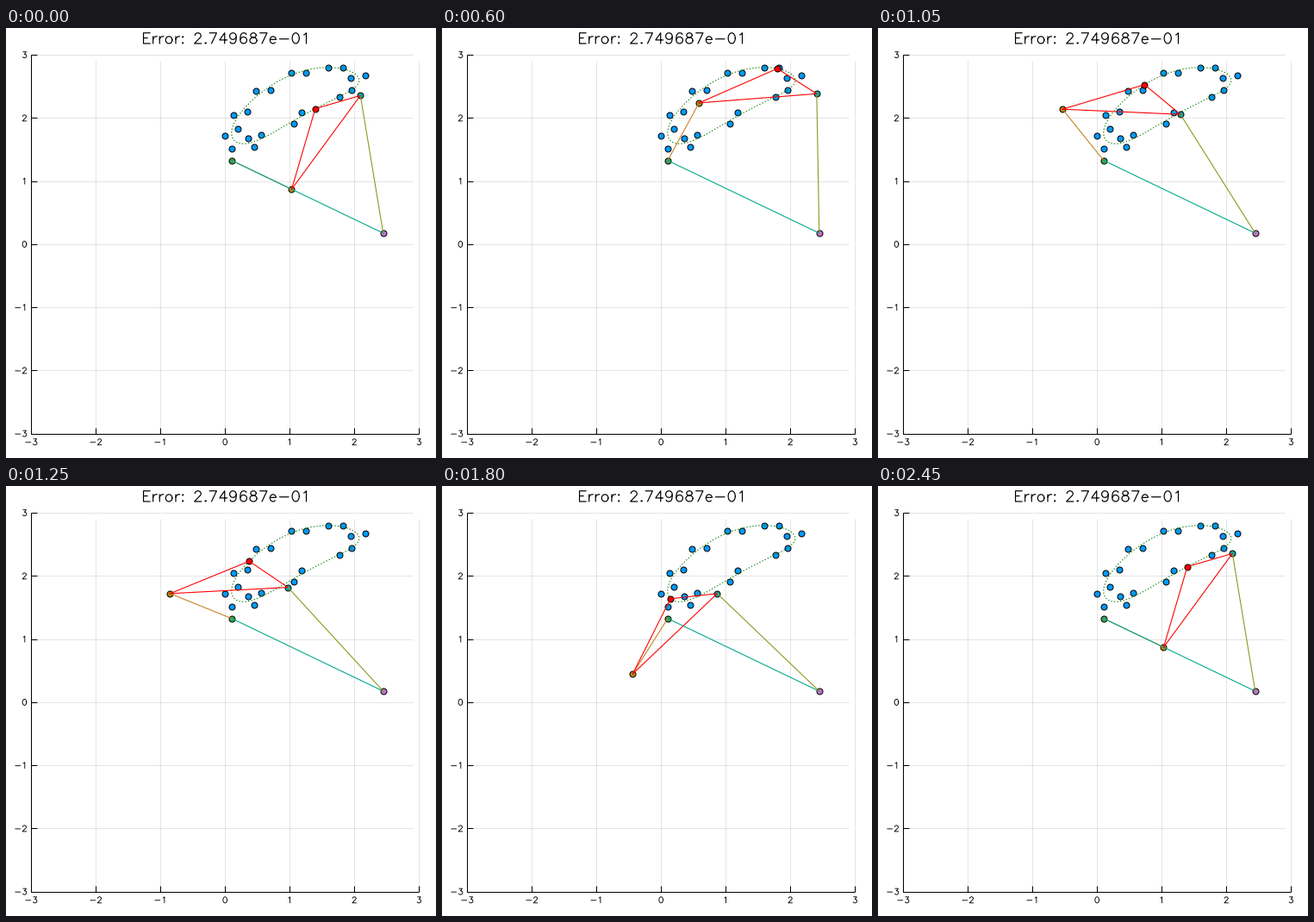
A matplotlib script for the animation above (2.5 s loop, 499 by 499 pixels).

```python
import numpy as np
import matplotlib.pyplot as plt
from matplotlib.animation import FuncAnimation
from matplotlib.collections import LineCollection

SIZE = 499
FRAMES = 50
PX = 0.72                       # points per pixel at 100 dpi
CENTER = np.array([254.2, 250.8])
SCALE = np.array([75.0, -73.25])

# Four-bar linkage, in data units
PIVOT_A = np.array([0.103, 1.325])
PIVOT_D = np.array([2.447, 0.174])
CRANK, COUPLER, ROCKER = 1.033, 1.8265, 2.2085
TRACER = (1.251, 0.446)         # along and across the coupler

SAMPLES = [
    (0.0, 1.715), (0.105, 1.51), (0.13, 2.05), (0.195, 1.827),
    (0.348, 2.10), (0.357, 1.677), (0.445, 1.545), (0.48, 2.425),
    (0.557, 1.737), (0.705, 2.435), (1.02, 2.72), (1.058, 1.902),
    (1.188, 2.082), (1.245, 2.717), (1.597, 2.792), (1.77, 2.328),
    (1.823, 2.80), (1.95, 2.626), (1.96, 2.446), (2.17, 2.67),
]


def to_px(points):
    return CENTER + np.asarray(points, float) * SCALE


def pose(turn):
    """Crank end, rocker end and traced point after a fraction of a turn."""
    base = PIVOT_D - PIVOT_A
    angle = np.arctan2(base[1], base[0]) + 2 * np.pi * turn
    b = PIVOT_A + CRANK * np.array([np.cos(angle), np.sin(angle)])
    gap = PIVOT_D - b
    dist = np.hypot(*gap)
    u = gap / dist
    along = (COUPLER**2 - ROCKER**2 + dist**2) / (2 * dist)
    height = np.sqrt(COUPLER**2 - along**2)
    c = b + along * u + height * np.array([-u[1], u[0]])
    v = (c - b) / COUPLER
    p = b + TRACER[0] * v + TRACER[1] * np.array([-v[1], v[0]])
    return b, c, p


# Single-stroke lettering: 21 units cap height, baseline at zero
def arc(cx, cy, rx, ry, start=0, end=360):
    t = np.radians(np.linspace(start, end, 25))
    return list(zip(cx + rx * np.cos(t), cy + ry * np.sin(t)))


def dot(y):
    return arc(5, y, 0.8, 0.8)


SIX = [arc(10.5, 6.5, 6.5, 6.5),
       [(16, 18), (15, 20), (12, 21), (10, 21), (7, 20), (5, 17), (4, 12), (4, 7)]]

GLYPHS = {
    " ": (15, []),
    "E": (19, [[(17, 21), (4, 21), (4, 0), (17, 0)], [(4, 11), (12, 11)]]),
    "r": (13, [[(4, 14), (4, 0)], [(4, 8), (5, 11), (7, 13), (9, 14), (12, 14)]]),
    "o": (19, [arc(9.5, 7, 6.5, 7)]),
    "e": (18, [[(3, 8), (15, 8)], arc(9, 7, 6, 7, 8, 315)]),
    ":": (10, [dot(13), dot(1)]),
    ".": (10, [dot(1)]),
    "−": (26, [[(4, 9), (22, 9)]]),
    "0": (20, [arc(10, 10.5, 7, 10.5)]),
    "1": (20, [[(6, 17), (8, 18), (11, 21), (11, 0)]]),
    "2": (20, [arc(10, 15.5, 6, 5.5, 175, -30) + [(3, 0), (17, 0)]]),
    "3": (20, [[(5, 21), (16, 21), (10, 13)] + arc(10, 6.5, 7, 6.5, 90, -150)]),
    "4": (20, [[(13, 0), (13, 21), (3, 7), (18, 7)]]),
    "6": (20, SIX),
    "7": (20, [[(3, 21), (17, 21), (7, 0)]]),
    "8": (20, [arc(10, 16.5, 5.5, 4.5), arc(10, 6, 7, 6)]),
    "9": (20, [[(20 - x, 21 - y) for x, y in s] for s in SIX]),
}


def write(text, x, baseline, unit, width, align=0.0):
    x -= align * unit * sum(GLYPHS[ch][0] for ch in text)
    strokes = []
    for ch in text:
        advance, lines = GLYPHS[ch]
        strokes += [[(x + unit * a, baseline - unit * b) for a, b in line]
                    for line in lines]
        x += unit * advance
    ax.add_collection(LineCollection(strokes, colors="black", linewidths=width * PX,
                                     capstyle="round", snap=False, zorder=2))


def segment(x0, y0, x1, y1, **style):
    ax.plot([x0, x1], [y0, y1], lw=PX, solid_capstyle="butt", zorder=1, **style)


def marker(color, z, points=()):
    xy = np.reshape(to_px(points), (-1, 2)) if len(points) else np.empty((0, 2))
    return ax.plot(xy[:, 0], xy[:, 1], "o", ms=7 * PX, mfc=color, mec="black",
                   mew=PX, zorder=z)[0]


def bar(color, z):
    return ax.plot([], [], color=color, lw=1.1 * PX, zorder=z)[0]


fig = plt.figure(figsize=(SIZE / 100, SIZE / 100), dpi=100, facecolor="white")
ax = fig.add_axes([0, 0, 1, 1])
ax.set_xlim(0, SIZE)
ax.set_ylim(SIZE, 0)
ax.axis("off")

left, bottom = to_px((-3, -3))
right, top = to_px((3, 3))
for n in range(-3, 4):
    gx, gy = to_px((n, n))
    segment(gx, bottom, gx, top + 7, color="black", alpha=0.1)
    segment(left, gy, right - 7, gy, color="black", alpha=0.1)
    segment(gx, bottom, gx, bottom - 6.5, color="black")
    segment(left, gy, left + 6.5, gy, color="black")
    label = f"{n}".replace("-", "−")
    write(label, gx, 483.8, 0.334, 0.9, align=0.5)
    write(label, 24.8, gy + 3.6, 0.334, 0.9, align=1)
segment(left, bottom, left, top, color="black")
segment(left, bottom, right, bottom, color="black")
write("Error: 2.749687e−01", 157.2, 18, 0.585, 1.2)

marker("#009afa", 3, SAMPLES)
trace = to_px([pose(t)[2] for t in np.linspace(0, 1, 200)])
ax.plot(trace[:, 0], trace[:, 1], color="#008000", lw=1.1 * PX,
        ls=(0, (1.2, 2)), dash_capstyle="butt", zorder=4)

marker("#3ea44e", 5, [PIVOT_A])
marker("#c371d2", 6, [PIVOT_D])
joint_b = marker("#ac8e18", 7)
joint_c = marker("#00aaae", 8)
joint_p = marker("#ff0000", 9)
crank = bar("#c68225", 10)
ground = bar("#00a98d", 11)
rocker = bar("#8e971e", 12)
coupler = bar("#ff0000", 13)
ground.set_data(*to_px([PIVOT_A, PIVOT_D]).T)


def update(i):
    b, c, p = pose(i / (FRAMES - 1))
    for artist, points in (
        (joint_b, [b]), (joint_c, [c]), (joint_p, [p]),
        (crank, [PIVOT_A, b]), (rocker, [PIVOT_D, c]), (coupler, [b, c, p, b]),
    ):
        artist.set_data(*to_px(points).T)
    return joint_b, joint_c, joint_p, crank, rocker, coupler


anim = FuncAnimation(fig, update, frames=FRAMES, interval=50, repeat=True,
                     repeat_delay=0, blit=False)
plt.show()
```
